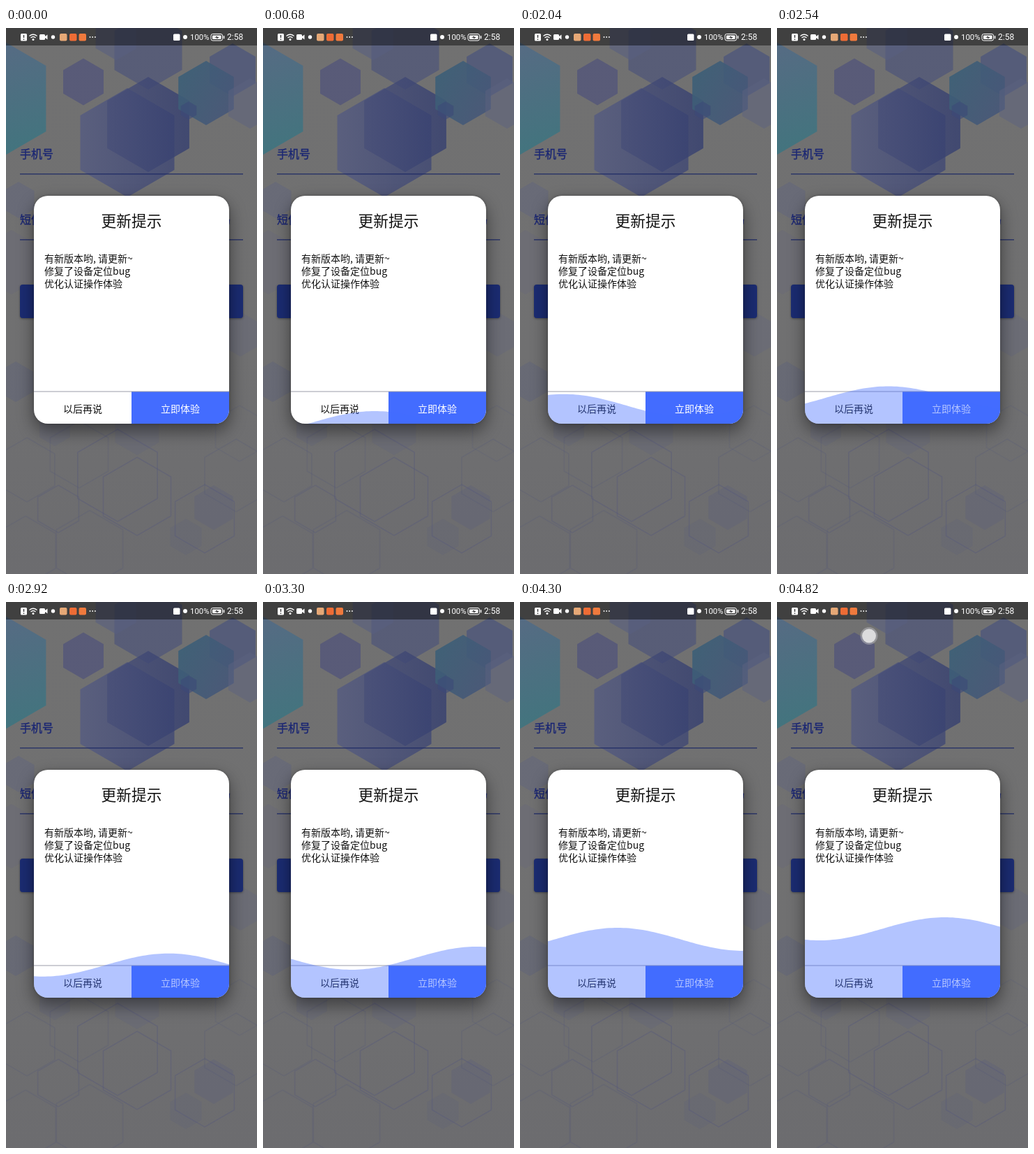
These frames come from a looping animation (360x781 px, 4840 ms). An HTML page:

```html
<!DOCTYPE html>
<html lang="zh-CN">
<head>
<meta charset="utf-8">
<title>更新提示</title>
<style>
  html, body { margin: 0; width: 100%; height: 100%; overflow: hidden; background: #717172; }
  svg { display: block; width: 100%; height: 100%; }
  text { font-family: "Noto Sans CJK SC", "Noto Sans CJK", "Noto Sans", sans-serif; font-size: 14px; }
  .status text { font-family: Roboto, "Noto Sans", sans-serif; font-size: 12px; }
  .label { font-size: 16px; fill: #1a2673; stroke: #1a2673; stroke-width: .35px; }
  .shadow { filter: drop-shadow(0 10px 12px rgba(0, 0, 0, .38)) drop-shadow(0 0 2px rgba(0, 0, 0, .25)); }
</style>
</head>
<body>
<svg viewBox="0 0 360 781" preserveAspectRatio="none">
  <defs>
    <linearGradient id="page" x2="0" y2="1">
      <stop offset="0" stop-color="#717171"/>
      <stop offset=".6" stop-color="#707071"/>
      <stop offset="1" stop-color="#6c6c6f"/>
    </linearGradient>
    <linearGradient id="teal" x2=".25" y2="1">
      <stop offset="0" stop-color="#5a6886"/>
      <stop offset="1" stop-color="#41747f"/>
    </linearGradient>
    <linearGradient id="blue" x2="1">
      <stop offset="0" stop-color="#565c80"/>
      <stop offset="1" stop-color="#424a74"/>
    </linearGradient>
    <linearGradient id="navy" x2="1">
      <stop offset="0" stop-color="#484f78"/>
      <stop offset="1" stop-color="#353f70"/>
    </linearGradient>
    <linearGradient id="sky" x2="1" y2=".6">
      <stop offset="0" stop-color="#3a6077"/>
      <stop offset="1" stop-color="#465778"/>
    </linearGradient>
    <clipPath id="card"><rect x="40" y="240" width="280" height="326" rx="20"/></clipPath>
  </defs>

  <rect width="360" height="781" fill="url(#page)"/>
  <g id="fills"></g>
  <g id="outlines" fill="none" stroke="#56597a"></g>

  <text class="label" x="20" y="185.500">手机号</text>
  <text class="label" x="20" y="279.500">短信验证码</text>
  <text class="label" x="322" y="279.500" text-anchor="end">获取验证码</text>
  <path d="M20 208.800H340M20 302.800H340" stroke="#1f2b66" stroke-width="1.300"/>
  <rect x="20" y="367" width="320" height="48" rx="4" fill="#1b2c72" style="filter:drop-shadow(0 1px 1.5px rgba(0,0,0,.35))"/>

  <g class="status" fill="#fff">
    <rect width="360" height="25" fill="#000" fill-opacity=".43"/>
    <rect x="21" y="8" width="9" height="10.500" rx="1.500"/>
    <path d="M25.500 10v4m0 1.500v1.500" stroke="#38383a" stroke-width="1.400"/>
    <path d="M33.500 11.500q5.500-4.500 11 0M35.500 14q3.500-3 7 0" fill="none" stroke="#fff" stroke-width="1.300"/>
    <circle cx="39" cy="16.500" r="1.500"/>
    <rect x="48" y="9" width="8" height="8" rx="1.500"/>
    <path d="M56 12l3.500-2.500v7L56 14z"/>
    <circle cx="67.500" cy="13" r="2.700"/>
    <rect x="77" y="8" width="10.500" height="10.500" rx="2" fill="#e6a876"/>
    <rect x="91" y="8" width="10.500" height="10.500" rx="2" fill="#ee6c35"/>
    <rect x="104.500" y="8" width="10.500" height="10.500" rx="2" fill="#f07a3d"/>
    <circle cx="120.500" cy="13" r=".9"/><circle cx="124.200" cy="13" r=".9"/><circle cx="127.900" cy="13" r=".9"/>
    <rect x="240" y="8.500" width="9.500" height="9.500" rx="1.500"/>
    <circle cx="257" cy="13" r="3"/>
    <text x="264" y="17.200" style="font-size:11.400px">100%</text>
    <rect x="294" y="8.500" width="16.500" height="9.500" rx="2.500" fill="none" stroke="#fff"/>
    <rect x="296" y="10.500" width="12.500" height="5.500" rx="1"/>
    <path d="M299 13.800l4-2.300v1.500h3l-4 2.400v-1.600z" fill="#38383a"/>
    <rect x="311.800" y="11" width="1.500" height="4.500" rx=".7"/>
    <text x="317" y="17.300">2:58</text>
  </g>

  <rect class="shadow" x="40" y="240" width="280" height="326" rx="20" fill="#fff"/>
  <g clip-path="url(#card)">
    <rect x="180" y="520" width="140" height="46" fill="#436cff"/>
    <path d="M40 520H320" stroke="#9a9ca8"/>
    <text x="180" y="284" text-anchor="middle" style="font-size:21.700px" fill="#111">更新提示</text>
    <g fill="#111">
      <text x="55" y="335">有新版本哟, 请更新~</text>
      <text x="55" y="353">修复了设备定位bug</text>
      <text x="55" y="371">优化认证操作体验</text>
      <text x="110" y="549.500" text-anchor="middle">以后再说</text>
    </g>
    <text x="250" y="549.500" text-anchor="middle" fill="#fff">立即体验</text>
    <path id="wave" fill="#436cff" fill-opacity=".4"/>
  </g>

  <g id="touch">
    <circle cx="132" cy="48.500" r="12.500" fill="#aeaeb2" fill-opacity=".6"/>
    <circle cx="132" cy="48.500" r="10" fill="#dcdcdd"/>
  </g>
</svg>

<script>
const LOOP = 4840, WAVE_START = 300, TOUCH_START = 4700;
const WAVELENGTH = 360, AMPLITUDE = 16.5, WAVE_PERIOD = 1862;
// [time, resting water line]
const LEVELS = [[300, 567], [680, 564.5], [1560, 551], [2540, 529], [3300, 509.5], [4300, 482.5], [4840, 467]];

const byId = id => document.getElementById(id);

function addHex(parent, cx, cy, r, attrs) {
  const points = Array.from({ length: 6 }, (_, i) => {
    const a = (i / 6 - 0.25) * 2 * Math.PI;
    return `${(cx + r * Math.cos(a)).toFixed(1)},${(cy + r * Math.sin(a)).toFixed(1)}`;
  }).join(' ');
  const hex = document.createElementNS('http://www.w3.org/2000/svg', 'polygon');
  hex.setAttribute('points', points);
  for (const name in attrs) hex.setAttribute(name, attrs[name]);
  parent.append(hex);
}

[
  [-24, 101, 94, 'url(#teal)', 0.95],
  [111, 77, 33.5, '#53567a', 0.8],
  [204, 32, 56, '#4e557a', 0.7],
  [158, 12, 34, '#596080', 0.6],
  [174, 164, 78, 'url(#blue)', 0.85],
  [204, 138, 68, 'url(#navy)', 0.8],
  [325, 60, 38, '#4c567c', 0.75],
  [287, 93, 46, 'url(#sky)', 0.9],
  [262, 118, 13, '#3c4a78', 0.6],
  [350, 108, 36, '#5c6280', 0.5],
  [18, 246, 26, '#5e6280', 0.4],
  [8, 335, 46, '#5e6280', 0.2],
  [336, 438, 32, '#5e6280', 0.25],
  [14, 506, 29, '#595e7c', 0.35],
  [70, 573, 25, '#5c607c', 0.25],
  [188, 575, 36, '#5c607c', 0.25],
  [298, 686, 32, '#595e7a', 0.3],
  [258, 728, 26, '#5c607a', 0.25]
].forEach(([cx, cy, r, fill, opacity]) =>
  addHex(byId('fills'), cx, cy, r, { fill, 'fill-opacity': opacity }));

[
  [160, 640, 66, 0.4], [188, 670, 56, 0.4], [75, 688, 34, 0.35], [30, 632, 46, 0.25],
  [105, 610, 48, 0.25], [285, 702, 49, 0.4], [330, 640, 52, 0.25], [120, 745, 55, 0.25],
  [28, 748, 50, 0.25], [335, 580, 40, 0.2]
].forEach(([cx, cy, r, opacity]) =>
  addHex(byId('outlines'), cx, cy, r, { 'stroke-opacity': opacity, 'stroke-width': 1.5 }));

function waterLevel(t) {
  const i = Math.max(1, LEVELS.findIndex(([time]) => time >= t));
  const [t0, y0] = LEVELS[i - 1], [t1, y1] = LEVELS[i];
  return y0 + (y1 - y0) * (t - t0) / (t1 - t0);
}

function wavePath(t) {
  const level = waterLevel(t);
  const crest = 160 + (t - 680) / WAVE_PERIOD * WAVELENGTH;
  let d = 'M40 566';
  for (let x = 40; x <= 320; x += 4) {
    const y = level - AMPLITUDE * Math.cos((x - crest) / WAVELENGTH * 2 * Math.PI);
    d += `L${x} ${Math.min(566, y).toFixed(2)}`;
  }
  return d + 'L320 566Z';
}

function render(t) {
  byId('wave').setAttribute('d', t < WAVE_START ? '' : wavePath(t));
  byId('touch').setAttribute('visibility', t < TOUCH_START ? 'hidden' : 'visible');
}

const start = performance.now();
function tick() {
  render((performance.now() - start) % LOOP);
  requestAnimationFrame(tick);
}
tick();
</script>
</body>
</html>
```
